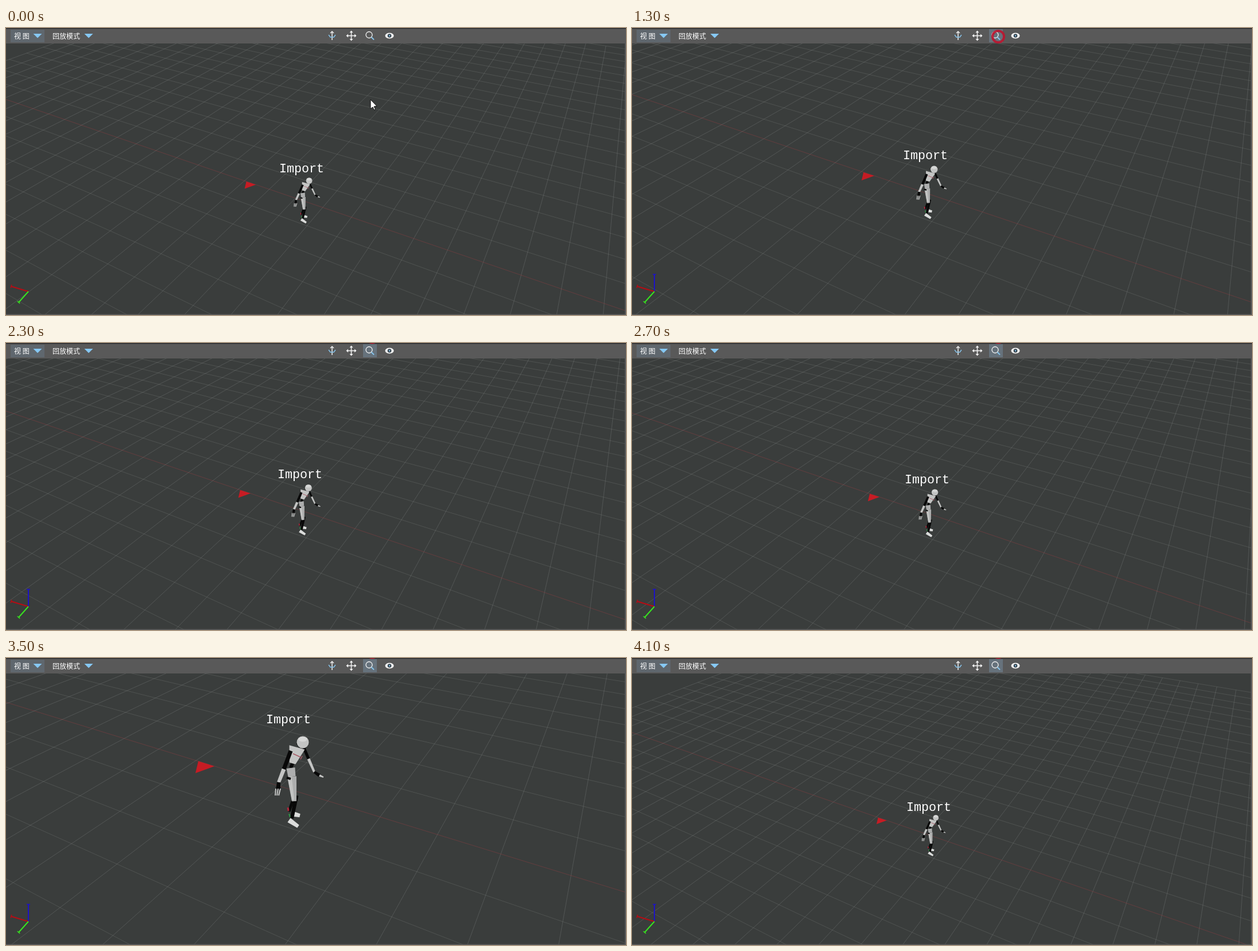
An HTML page with a canvas for the animation above (4500 ms loop, 1080 px wide and 501 px high).

```html
<!DOCTYPE html>
<html lang="zh">
<head>
<meta charset="utf-8">
<style>
html, body { margin: 0; width: 100%; height: 100%; overflow: hidden; background: #3a3d3c; }
canvas { display: block; }
</style>
</head>
<body>
<canvas id="stage" width="1080" height="501"></canvas>
<script>
const g = document.getElementById('stage').getContext('2d');
const W = 1080, H = 501, LOOP = 4500, STEP = 100;
const WHITE = '#f4f4f4', BLUE = '#86c4ec', LIGHT = '#c3c4c3', MID = '#adaeae', DARK = '#080808';

// Camera: vanishing centre, focal length, pitch of 45 degrees, yaw
const CX = 540, CY = 396, FOCAL = 741, TILT = Math.SQRT1_2;
const YAW = 28.7 * Math.PI / 180, COS = Math.cos(YAW), SIN = Math.sin(YAW);
// Ground grid: cell size, height under the camera, place of the character's cell
const CELL = .1408, DROP = .604, A0 = .407, B0 = .805, HALF = 20;
let dolly = 0;   // camera distance, 0 = closest

const smooth = (t, from, to) => {
  const k = Math.min(1, Math.max(0, (t - from) / (to - from)));
  return k * k * (3 - 2 * k);
};

// The user drags in, out, in and out again
function dollyAt(t) {
  const drags = [[1000, 1800, .105], [1900, 2500, .85], [2500, 3420, 0], [3500, 4100, 1]];
  return drags.reduce((d, [from, to, goal]) => d + (goal - d) * smooth(t, from, to), .82);
}

function line(pts, color, width) {
  g.beginPath();
  pts.forEach(p => g.lineTo(...p));
  g.strokeStyle = color;
  g.lineWidth = width;
  g.stroke();
}

function fill(pts, color) {
  g.beginPath();
  pts.forEach(p => g.lineTo(...p));
  g.fillStyle = color;
  g.fill();
}

function disc(x, y, rx, ry, color) {
  g.beginPath();
  g.ellipse(x, y, rx, ry, 0, 0, 7);
  g.fillStyle = color;
  g.fill();
}

function ring(x, y, r, color, width) {
  g.beginPath();
  g.arc(x, y, r, 0, 7);
  g.strokeStyle = color;
  g.lineWidth = width;
  g.stroke();
}

function rect(x, y, w, h, color) {
  g.fillStyle = color;
  g.fillRect(x, y, w, h);
}

// Grid point in camera space
function ground(i, j) {
  const a = A0 + i * CELL, b = B0 + j * CELL, depth = (a * SIN + b * COS) * TILT;
  return [b * SIN - a * COS, DROP * TILT - depth, DROP * TILT + depth + dolly];
}

function groundLine(p, q, color) {
  const near = .1;
  if (p[2] < near) {
    const k = (near - p[2]) / (q[2] - p[2]);
    p = p.map((c, n) => c + (q[n] - c) * k);
  }
  line([p, q].map(([x, y, z]) => [CX + FOCAL * x / z, CY + FOCAL * y / z]), color, 1);
}

function drawGrid() {
  for (let n = -HALF; n <= HALF; n++) {
    groundLine(ground(n, -HALF), ground(n, HALF), 'rgba(160,164,162,.24)');
    groundLine(ground(-HALF, n), ground(HALF, n), n ? 'rgba(160,164,162,.2)' : 'rgba(165,62,66,.38)');
  }
}

// Objects are posed as seen from the closest camera, then pulled towards the centre
const scaleAt = z => z / (z + dolly);
const move = ([x, y], z) => [CX + (x - CX) * scaleAt(z), CY + (y - CY) * scaleAt(z)];
const bodyDepth = y => .887 + (y - 147) * .0008;

// Tapered limb from a to b
function bone(a, b, color, wa, wb = wa) {
  const angle = Math.atan2(b[1] - a[1], b[0] - a[0]) + Math.PI / 2;
  const side = ([x, y], w) => move([x + Math.cos(angle) * w / 2, y + Math.sin(angle) * w / 2], bodyDepth(y));
  fill([side(a, wa), side(b, wb), side(b, -wb), side(a, -wa)], color);
}

function arm(shoulder, elbow, wrist, hand, thick) {
  bone(shoulder, elbow, DARK, thick);
  bone(elbow, wrist, LIGHT, thick, thick - 1);
  bone(wrist, hand, DARK, thick - 1, thick + 1);
}

function foot(heel, toe) {
  bone(heel, toe, '#dcdddc', 9, 6);
}

function drawBody() {
  const head = [517, 147], neck = [508, 153], chest = [507, 156], waist = [499, 184];
  const pelvis = [496, 192], hip = [498, 207], knee = [502, 250], ankle = [498, 280];
  const wrist = [475, 217], farWrist = [537, 199], farHand = [546, 205];

  bone([499, 250], [493, 268], DARK, 5);
  foot([499, 272], [512, 275]);
  bone([491, 261], [492, 267], '#b0283c', 3);
  bone([493, 272], [495, 278], '#2f9a46', 2);
  arm([519, 157], [527, 176], farWrist, farHand, 5);
  bone(farHand, [553, 208], LIGHT, 4, 2);

  bone([506, 240], ankle, DARK, 7, 6);
  foot([493, 283], [509, 294]);
  bone(hip, knee, MID, 16, 8);
  bone([494, 207], [500, 248], LIGHT, 7, 4);

  bone(waist, pelvis, DARK, 6);
  bone(pelvis, hip, MID, 15, 13);
  bone([489, 209], [496, 211], DARK, 4);
  bone(head, neck, DARK, 8);
  bone(chest, waist, LIGHT, 28, 11);
  bone([500, 167], [513, 173], '#a85a66', 1.5);
  bone([513, 177], [516, 171], '#a85a66', 1.5);

  arm([496, 162], [484, 194], wrist, [474, 230], 7);
  for (let n = 0; n < 3; n++) bone([470 + n * 4, 228], [469 + n * 3, 240], LIGHT, 2);

  const [x, y] = move(head, bodyDepth(head[1])), r = 10.5 * scaleAt(bodyDepth(head[1]));
  disc(x, y, r, r, LIGHT);
  disc(x, y - r * .5, r * .75, r * .4, '#d6d7d6');
}

function drawScene() {
  fill([[330, 201], [335, 180], [363, 189]].map(p => move(p, 1.19)), '#c61c24');
  drawBody();
  const [x, y] = move([492, 107], .895);
  text('Import', Math.round(x), Math.round(y) + 7, '21.7px "Liberation Mono", monospace', 'center');
}

function text(str, x, y, font, align = 'left') {
  g.font = font;
  g.textAlign = align;
  g.fillStyle = '#fff';
  g.fillText(str, x, y);
}

// One arm of the orientation mark, with a small tick at its tip
function axis(color, x, y) {
  const r = Math.hypot(x, y), tip = [39 + x, 460 + y], nx = -y / r * 3, ny = x / r * 3;
  line([[39, 460], tip], color, 2);
  line([[tip[0] - nx, tip[1] - ny], [tip[0] + nx, tip[1] + ny]], color, 1.5);
}

function drawGizmo(t) {
  if (t >= STEP) axis('#1c12c8', 0, -30);
  axis('#b80c14', -30, -9);
  axis('#38e420', -17, 19);
}

function drawIcons() {
  const y = 13.5;
  // turn
  line([[568, 6], [568, 21]], WHITE, 1.5);
  line([[565, 9], [568, 6], [571, 9]], WHITE, 1.3);
  line([[562, 12], [565, 16], [571, 16], [574, 12]], BLUE, 1.4);
  // pan
  for (let n = 0; n < 4; n++) {
    const c = Math.cos(n * Math.PI / 2), s = Math.sin(n * Math.PI / 2);
    const turn = ([u, v]) => [601.5 + u * c - v * s, y + u * s + v * c];
    line([[0, 0], [7, 0]].map(turn), WHITE, 1.5);
    fill([[9, 0], [5.5, -3], [5.5, 3]].map(turn), WHITE);
  }
  // zoom
  ring(632.5, 12, 5.5, WHITE, 1.3);
  line([[636.5, 16], [641, 20.5]], BLUE, 2);
  // eye
  disc(668, y, 7.5, 5, WHITE);
  disc(668, y, 3.3, 3.3, '#35424c');
  disc(668, y, 1.2, 1.2, BLUE);
}

function drawBar(t) {
  const font = '12px "Noto Sans CJK SC", "Noto Sans CJK", sans-serif';
  rect(W - 2, 27, 2, H, '#5a5a5a');
  rect(0, H - 1.5, W, 2, '#5a5a5a');
  rect(0, 0, W, 27, '#595959');
  rect(0, 0, W, 1.5, '#2b2a2d');
  rect(8, 3, 59, 22, '#5f676e');
  if (t >= 800) rect(622, 2, 24, 23, '#66727c');
  text('视 图', 14, 19, font);
  text('回放模式', 81, 19, font);
  for (const x of [55, 144]) fill([[x - 7.5, 10], [x + 7.5, 10], [x, 17.5]], '#86c8f4');
  drawIcons();
}

// The arrow flies to the zoom icon; while pressed it becomes a red ring that leaves at the top
function drawPointer(t) {
  if (t >= 1200) return ring(638, t < 1400 ? 15 : -10.5, 10, 'rgba(190,18,44,.88)', 4);
  const y = 125 - 111 * smooth(t, 200, 800);
  const pts = [[0, 0], [0, 16], [4, 13], [6, 18], [8.5, 17], [6, 12], [11, 11.5], [0, 0]]
    .map(p => [635 + p[0], y + p[1]]);
  fill(pts, '#fff');
  line(pts, '#111', 1);
}

const start = performance.now();
function frame() {
  const t = Math.floor((performance.now() - start) % LOOP / STEP) * STEP;
  dolly = dollyAt(t);
  rect(0, 0, W, H, '#3a3d3c');
  drawGrid();
  drawScene();
  drawGizmo(t);
  drawBar(t);
  drawPointer(t);
  requestAnimationFrame(frame);
}
frame();
</script>
</body>
</html>
```
